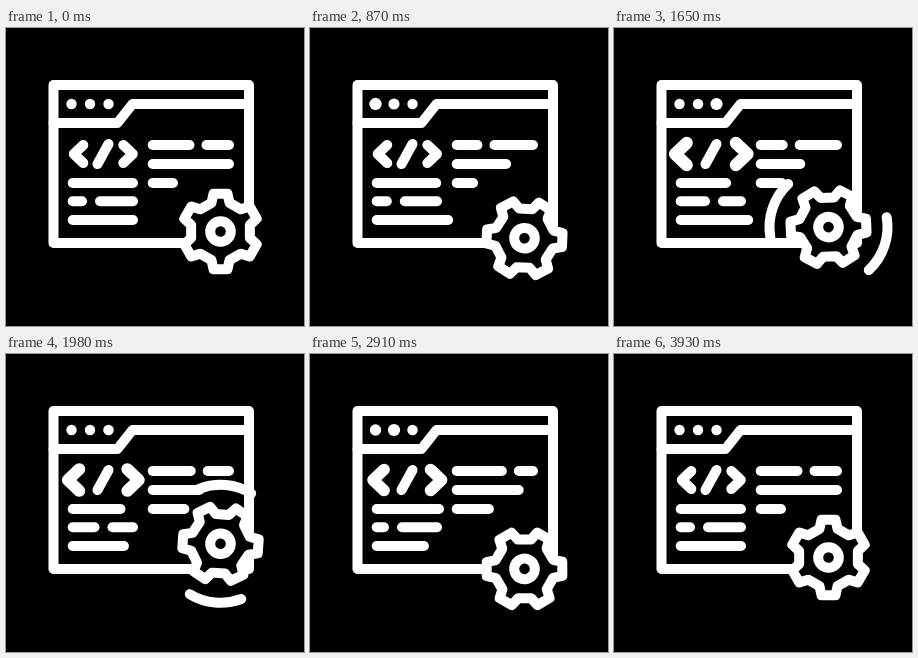
Recreate the animation shown at these times as an HTML page with a canvas. Size 298 by 298 pixels, loop 4500 ms.

```html
<!DOCTYPE html>
<html lang="en">
<head>
<meta charset="utf-8">
<title>Code window</title>
<style>
html, body { margin: 0; width: 100%; height: 100%; overflow: hidden; background: #000; }
canvas { display: block; width: 298px; height: 298px; }
</style>
</head>
<body>
<canvas id="stage"></canvas>
<script>
const SIZE = 298, LOOP = 4500, START = 300, END = 3930, RAD = Math.PI / 180;
const canvas = document.getElementById('stage');
const ctx = canvas.getContext('2d');
const dpr = window.devicePixelRatio || 1;
canvas.width = canvas.height = Math.round(SIZE * dpr);

const span = (t, from, to) => Math.min(1, Math.max(0, (t - from) / (to - from)));
const glide = (t, from, to) => (1 - Math.cos(Math.PI * span(t, from, to))) / 2;
const pulse = (t, from, to) => Math.sin(Math.PI * span(t, from, to)) ** 2;

// Steeper in the middle than glide.
function whirl(t, from, to) {
  const u = span(t, from, to);
  return u * u / (u * u + (1 - u) ** 2);
}

// Offset that eases to one extreme, then to the other, then home.
function swing(t, first, second, delay = 0) {
  const s = t - delay;
  return first * glide(s, START, 1250)
    + (second - first) * glide(s, 1250, 2450)
    - second * glide(s, 2450, 3500);
}

// Dip, leap, land, recover.
const gearY = t => 203.5
  + 11 * glide(t, START, 1300)
  - 25 * glide(t, 1300, 1910)
  + 25.5 * glide(t, 1910, 2950)
  - 11.5 * glide(t, 2950, 3850);

// Wind up, spin back, settle.
const gearTurn = t => 55 * glide(t, START, 1320)
  - 385 * whirl(t, 1320, 2850)
  - 30 * glide(t, 2850, END);

function polyline(...points) {
  ctx.beginPath();
  points.forEach(([x, y]) => ctx.lineTo(x, y));
  ctx.stroke();
}
const bar = (y, x0, x1) => polyline([x0, y], [x1, y]);

function drawWindow() {
  ctx.strokeRect(47.5, 57, 195.5, 158);
  polyline([47.5, 95], [111.5, 95], [126.5, 76], [243, 76]);
}

function drawDots(t) {
  const phase = t < START || t > END ? 0 : (t - START) % 1815;
  for (let i = 0; i < 3; i++) {
    const begin = i * 360;
    ctx.beginPath();
    ctx.arc(65.5 + 18.5 * i, 76, 5.2 + pulse(phase, begin, begin + 1060), 0, 2 * Math.PI);
    ctx.fill();
  }
}

function drawTag(t) {
  const scale = 1 + 0.235 * (pulse(t, 800, 2700) + pulse(t, 2450, END));
  for (const side of [-1, 1]) {
    ctx.save();
    ctx.translate(97.3, 126);
    ctx.scale(side * scale, scale);
    polyline([20, -9], [29.5, 0], [20, 9]);
    ctx.restore();
  }
  polyline([102.5, 116], [91.5, 136]);
}

function drawLines(t) {
  const left = 66.7, middle = 146.7, late = 430;
  const upperGap = 192 + swing(t, -24.5, 14);
  const lowerGap = 85 + swing(t, 15, -2, late);
  bar(117, middle, upperGap - 8.5);
  bar(117, upperGap + 8.5, 223);
  bar(136, middle, 223 + swing(t, -41, -24));
  bar(155, left, 127 + swing(t, -15, 2, late));
  bar(155, middle, 167 + swing(t, -6, 20));
  bar(173.3, left, lowerGap - 9);
  bar(173.3, lowerGap + 9, 127);
  bar(192, left, 127 + swing(t, 17, -22));
}

function drawArcs(t) {
  if (t < 1200 || t >= 2430) return;
  const head = 238 * glide(t, 1250, 2430);
  const tail = 238 * glide(t, 1570, 2430);
  for (const start of [52, 232]) {
    ctx.beginPath();
    ctx.arc(214.5, gearY(t), 59, (start - head) * RAD, (start - tail + 0.1) * RAD);
    ctx.stroke();
  }
}

function drawGear(t) {
  ctx.save();
  ctx.translate(214.5, gearY(t));
  ctx.rotate(gearTurn(t) * RAD);
  ctx.beginPath();
  for (let i = 0; i < 6; i++) {
    const a = (i * 60 - 90) * RAD, c = Math.cos(a), s = Math.sin(a);
    const corner = (r, side) => ctx.lineTo(r * c - side * s, r * s + side * c);
    corner(28.7, -9);
    corner(37.8, -7);
    corner(37.8, 7);
    corner(28.7, 9);
  }
  ctx.closePath();
  ctx.fillStyle = '#000';
  ctx.fill();
  ctx.stroke();
  ctx.beginPath();
  ctx.arc(0, 0, 10.3, 0, 2 * Math.PI);
  ctx.stroke();
  ctx.restore();
}

function draw(t) {
  ctx.setTransform(dpr, 0, 0, dpr, 0, 0);
  ctx.fillStyle = '#000';
  ctx.fillRect(0, 0, SIZE, SIZE);
  ctx.fillStyle = ctx.strokeStyle = '#fff';
  ctx.lineCap = ctx.lineJoin = 'round';
  ctx.lineWidth = 10;
  drawWindow();
  drawDots(t);
  drawTag(t);
  drawLines(t);
  drawArcs(t);
  drawGear(t);
}

const began = performance.now();
function tick() {
  draw((performance.now() - began) % LOOP);
  requestAnimationFrame(tick);
}
tick();
</script>
</body>
</html>
```
